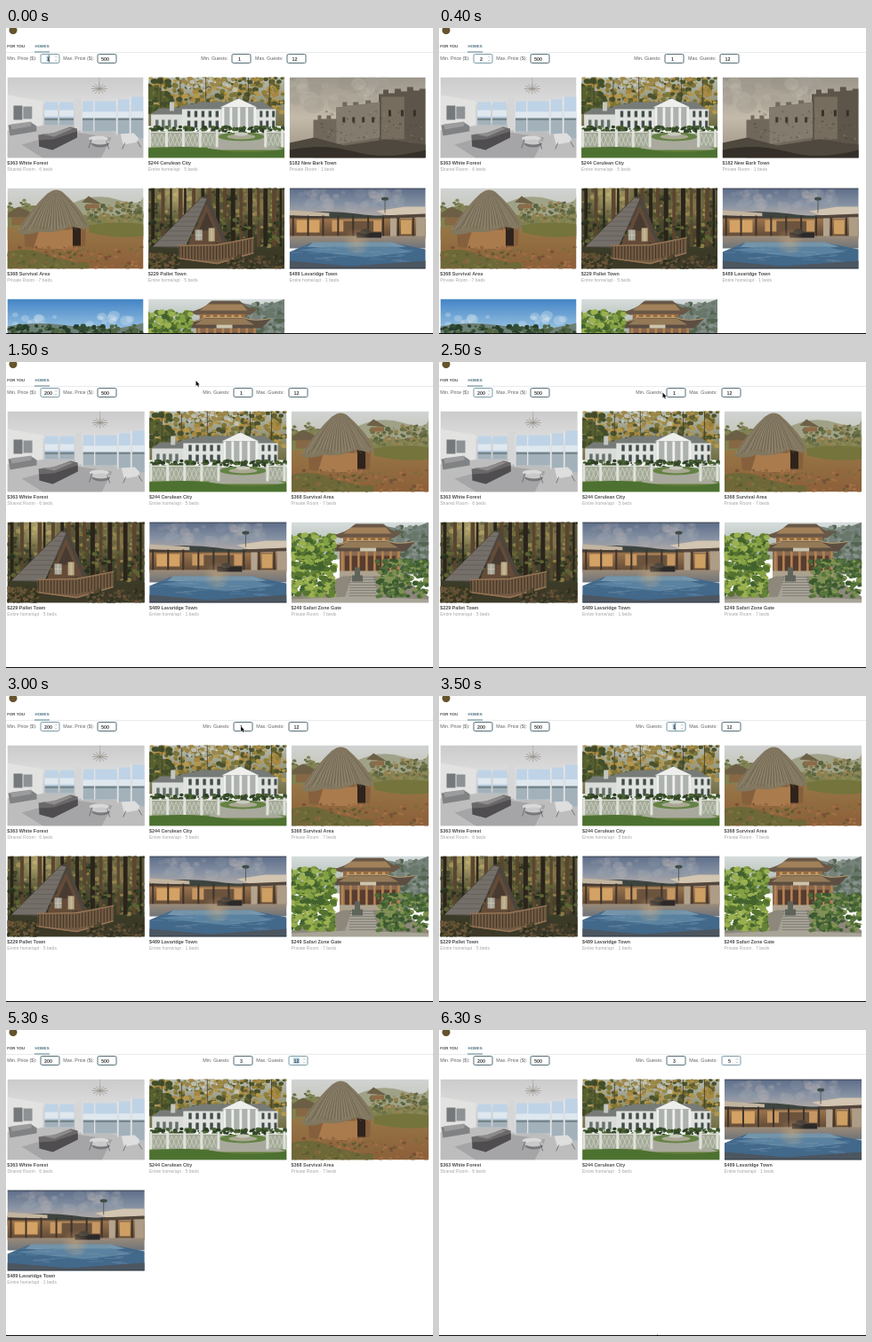
An HTML page with a canvas that plays this animation: 480 by 345 pixels, repeating every 6400 ms.

```html
<!DOCTYPE html>
<html lang="en">
<head>
<meta charset="utf-8">
<title>Homes</title>
<style>
html, body { margin: 0; width: 100%; height: 100%; overflow: hidden; background: #fff; }
canvas { display: block; width: 480px; height: 345px; }
</style>
</head>
<body>
<canvas id="stage" width="480" height="345"></canvas>
<script>
const LOOP = 6400, STEP = 100, PHOTO_W = 154, PHOTO_H = 91;
const SANS = '"Liberation Sans", Arial, sans-serif';
const c = document.getElementById('stage').getContext('2d');

// ---------- drawing helpers ----------
let seed = 1;
function rnd() {
  seed = (seed * 16807) % 2147483647;
  return seed / 2147483647;
}
function box(color, x, y, w, h) {
  c.fillStyle = color;
  c.fillRect(x, y, w, h);
}
function shape(color, path) {
  c.fillStyle = color;
  c.fill(new Path2D(path));
}
function line(color, width, path) {
  c.strokeStyle = color;
  c.lineWidth = width;
  c.stroke(new Path2D(path));
}
function oval(color, x, y, rx, ry) {
  c.fillStyle = color;
  c.beginPath();
  c.ellipse(x, y, rx, ry, 0, 0, 7);
  c.fill();
}
function fade(y, h, ...colors) {
  const g = c.createLinearGradient(0, y, 0, y + h);
  colors.forEach((color, i) => g.addColorStop(i / (colors.length - 1), color));
  box(g, 0, y, PHOTO_W, h);
}
function glow(color, x, y, r) {
  const g = c.createRadialGradient(x, y, 0, x, y, r);
  g.addColorStop(0, color);
  g.addColorStop(1, color.slice(0, 7) + '00');
  oval(g, x, y, r, r);
}
function dabs(count, x, y, w, h, size, ...colors) {
  for (let i = 0; i < count; i++) {
    const r = size * (.5 + rnd());
    oval(colors[i % colors.length], x + rnd() * w, y + rnd() * h, r, r * .8);
  }
}
function row(color, x0, x1, gap, y, w, h) {
  for (let x = x0; x <= x1; x += gap) box(color, x, y, w, h);
}
function text(str, x, y, size, color, weight = '', align = 'left') {
  c.font = `${weight} ${size}px ${SANS}`;
  c.textAlign = align;
  c.fillStyle = color;
  c.fillText(str, x, y);
}

// ---------- photos, each in a 154 x 91 area ----------
function room() {
  fade(0, 30, '#cbcbcc', '#dcdcdc');
  fade(30, 61, '#d6d5d4', '#bbbaba');
  shape('#e2e2e1', 'M0 20L40 27V54L0 62Z');
  shape('#bdbdbd', 'M0 60L62 52L154 68V91H0Z');
  shape('#a5a5a7', 'M16 76L70 61L118 68L106 91H40Z');
  for (const [x, y, w, h] of [[42, 28, 15, 26], [59, 28, 16, 26], [85, 27, 38, 34], [125, 25, 13, 39], [140, 22, 14, 47]]) {
    box('#bfd3e6', x, y, w, h);
    box('#dfe8ef', x, y + h * .35, w, h * .27);
    box('#76868c', x, 46, w, 3);
    box('#a3b1ba', x, 49, w, y + h - 49);
  }
  line('#e6e6e6', 1.2, 'M84 26V62M98 27V61M124 25V65M139 22V69');
  box('#d6d6d6', 76, 24, 8, 36);
  box('#74797b', 7, 32, 10, 16);
  box('#8f9294', 18, 33, 10, 14);
  shape('#808284', 'M1 54L27 51L33 55V61L3 66Z');
  shape('#9c9c9e', 'M4 53L27 50V55L5 59Z');
  shape('#6a6868', 'M35 65L52 63L71 56L79 58V68L51 82L36 78Z');
  shape('#4f4d4f', 'M36 71L52 70L79 61V68L51 82L36 78Z');
  shape('#8d8b8b', 'M38 64L51 63L70 57L74 58L53 67Z');
  oval('#d9d9d9', 103, 69, 11, 3);
  oval('#77787a', 105, 75, 10, 4);
  oval('#c9c9ca', 105, 73, 10, 3);
  shape('#dedede', 'M128 64L143 63L148 68V73L131 76Z');
  line('#626467', .8, 'M95 70L92 80M112 72L115 81M133 74L130 81M147 72L151 79');
  for (let i = 0; i < 12; i++) {
    const a = i * Math.PI / 6;
    line('#8d887d', .6, `M104 13l${9 * Math.cos(a)} ${6 * Math.sin(a)}`);
  }
  line('#999', .5, 'M104 0V13');
}

function mansion() {
  fade(0, 55, '#b5bcb2', '#716d42');
  dabs(420, 0, 0, 154, 40, 2.4, '#95803a', '#615f30', '#a98740', '#4b522b', '#b4974c', '#7c7538');
  dabs(50, 38, 0, 62, 15, 2.5, '#ccd4d8b0', '#9a8648');
  dabs(60, 0, 4, 24, 38, 3, '#424d2a', '#57602f');
  line('#453b29', .8, 'M14 0V34M36 3V28M65 0V25M113 0V28M137 0V38');
  shape('#777b78', 'M3 42L12 35H31L40 32L61 28H130L143 37V44H3Z');
  box('#d9dcd9', 3, 42, 36, 17);
  box('#dfe2de', 38, 36, 106, 23);
  shape('#eeefec', 'M81 34L102 24L123 34Z');
  box('#aeb2ae', 83, 34, 38, 25);
  row('#f0f1ee', 83, 121, 9, 34, 2.8, 26);
  row('#434d4b', 44, 77, 8, 38, 3.4, 7);
  row('#434d4b', 44, 77, 8, 49, 3.4, 8);
  row('#434d4b', 126, 141, 7, 38, 3, 7);
  row('#434d4b', 126, 141, 7, 49, 3, 8);
  row('#67716b', 8, 34, 7, 48, 3.4, 9);
  box('#c4c6c2', 24, 28, 5, 10);
  dabs(150, 0, 56, 154, 7, 2, '#34492a', '#4a6131', '#2b3d23');
  fade(64, 27, '#7d9247', '#557433');
  shape('#a9aa9d', 'M76 63H132L143 78L154 82H66Z');
  oval('#648243', 105, 67, 26, 5);
  oval('#a9a893', 105, 67, 16, 3);
  oval('#c8c9bf', 105, 64, 8, 2);
  for (const [x, w] of [[0, 76], [131, 23]]) {
    box('#a4ab98', x, 62, w, 17);
    for (let i = x; i < x + w - 3; i += 5) line('#d2d5ca', .7, `M${i} 64l5 13M${i + 5} 64l-5 13`);
    box('#dadcd3', x, 61, w, 1.5);
    row('#e0e2da', x, x + w, 19, 59, 3, 20);
  }
  shape('#4d7130', 'M0 80Q48 76 80 82T154 81V91H0Z');
}

function castle() {
  fade(0, 91, '#9b958a', '#c3baaa', '#9a9080');
  dabs(45, 0, 0, 115, 32, 8, '#aaa39835', '#c8c1b540', '#8b857c30');
  shape('#70685b', 'M27 91V48H32V43H36V47H42V43H47V47H53V34H60V28H65V32H72V28H78V31H86V26H92V29H102V91Z');
  shape('#5d554a', 'M101 91V19H106V14H112V18H119V13H126V16H133V11H140V15H147V13H154V91Z');
  shape('#837b6d', 'M53 34L102 28V68L53 76Z');
  shape('#766d5f', 'M104 22H130V70H104Z');
  dabs(180, 31, 37, 120, 46, 1, '#4b443b80', '#928a7a70', '#62594d90');
  row('#3d372f', 60, 98, 11, 45, 3, 6);
  row('#373129', 112, 146, 14, 37, 3, 7);
  shape('#4f483e', 'M0 74L28 68L62 77L110 70L154 76V91H0Z');
  shape('#342f28', 'M0 82Q38 74 74 84T154 82V91H0Z');
}

function hut() {
  fade(0, 38, '#d0d3d2', '#c1c1b1');
  shape('#a0a288', 'M70 19Q98 4 125 13T154 9V45H55Z');
  shape('#81814f', 'M0 25Q30 14 68 26T154 26V58H0Z');
  dabs(130, 88, 16, 66, 22, 2, '#6a7048', '#8c8859', '#59633f', '#94804f');
  dabs(40, 0, 12, 30, 22, 2, '#68714a', '#858558');
  fade(44, 47, '#967646', '#8c5f39');
  shape('#74743c', 'M92 42Q124 36 154 41V54Q126 58 93 50Z');
  shape('#6c5f45', 'M1 28L13 21L28 28V33H1Z');
  box('#876744', 5, 33, 20, 9);
  shape('#6c6147', 'M84 16L92 9L107 18Z');
  box('#8c6b48', 89, 18, 15, 5);
  shape('#86603d', 'M18 40H89L88 65Q55 73 20 66Z');
  shape('#a97b4d', 'M36 47H74V68Q48 70 30 67Z');
  box('#2f231b', 74, 42, 9, 23);
  shape('#82775f', 'M11 50Q25 25 46 6Q54 -1 62 4Q78 18 88 33L93 45Q84 47 73 43Q54 52 36 49Q20 55 11 50Z');
  for (let i = 0; i < 42; i++) {
    const x = 13 + i * 1.85;
    line(i % 2 ? '#655b48' : '#9e937c', .6, `M${54 + (x - 54) * .2} 6Q${54 + (x - 54) * .55} 18 ${x} ${41 + rnd() * 7}`);
  }
  dabs(160, 0, 66, 154, 25, 1.6, '#a36f46', '#785135', '#93663d', '#806a3d');
  shape('#6d6838', 'M0 72Q20 66 44 75T92 84V91H0Z');
  dabs(60, 0, 72, 80, 18, 1.6, '#7b733f', '#5d5c32', '#85633c');
}

function cabin() {
  fade(0, 91, '#5e5a3b', '#2f3222');
  dabs(380, 0, 0, 154, 66, 2.2, '#28331f', '#51542d', '#736c3c', '#384126', '#897c47');
  glow('#e1cf8aa8', 34, 8, 34);
  glow('#c5ac6a80', 122, 20, 28);
  for (let x = 3; x < 154; x += 9) box(x % 2 ? '#2c241b' : '#5b452f', x + rnd() * 4, 0, 2 + rnd() * 3, 66);
  dabs(110, 0, 34, 154, 28, 2, '#353f25', '#5d6234', '#28301f');
  shape('#4d463e', 'M4 66L60 10L67 9L88 60L79 64L66 20L40 68Z');
  shape('#756f69', 'M5 66L60 11L66 12L42 66Z');
  for (let i = 0; i < 9; i++) line('#5d5751', .6, `M${55 - i * 5.4} ${16 + i * 5.4}H${64 - i * 2.3}`);
  shape('#644b38', 'M66 18L84 61L44 66Z');
  shape('#473a30', 'M66 27L75 48H57Z');
  box('#a9a99d', 53, 47, 8, 12);
  box('#b9aa85', 68, 45, 7, 15);
  line('#d0cab6', .7, 'M57 47V59M71.5 45V60M53 53H61');
  shape('#735b43', 'M34 66L85 62L119 57V74L78 86L34 80Z');
  for (let x = 35; x < 119; x += 3.5) {
    const y = x < 78 ? 65 : 65 - (x - 78) * .2;
    line('#3f3326', 1, `M${x} ${y}v16`);
  }
  line('#957354', 1.5, 'M33 65L78 64L119 56M33 79L78 85L119 73');
  shape('#3c3927', 'M0 72Q16 65 34 80L78 87L119 74L154 68V91H0Z');
  dabs(130, 0, 74, 34, 17, 1.6, '#5a502f', '#30331f', '#6b5539');
  dabs(110, 90, 76, 64, 15, 1.6, '#53492f', '#2d3020', '#665138');
}

function pool() {
  fade(0, 36, '#5d6d89', '#8490a2', '#bfb2a8');
  dabs(55, 12, 2, 120, 21, 5, '#a7a9b128', '#c8bcb828');
  shape('#3d443f', 'M0 29Q42 24 77 29T125 27V40H0Z');
  shape('#c2b49f', 'M0 25L45 28V32L0 31Z');
  shape('#463b33', 'M0 31L45 32V35H0Z');
  box('#8c6846', 0, 34, 154, 23);
  fade(35, 19, '#99724b', '#644c38');
  box('#d3a264', 8, 36, 26, 14);
  box('#c69762', 48, 36, 56, 13);
  box('#6c533d', 61, 37, 34, 14);
  row('#3f342c', 3, 150, 17, 31, 2, 24);
  shape('#d2c5b1', 'M98 26L130 21H154V29L112 31Z');
  shape('#53463b', 'M104 31L154 29V33L112 34Z');
  shape('#b4a48f', 'M114 34H121V56H114Z');
  box('#cd9f62', 126, 36, 12, 16);
  box('#ad9c86', 143, 33, 11, 22);
  fade(54, 14, '#9a8b79', '#6e737a');
  box('#2b2929', 76, 50, 28, 6);
  oval('#4a443c', 86, 49, 6, 3);
  shape('#42688a', 'M0 72L24 62H118L154 69V91H0Z');
  shape('#7394aa', 'M27 61H116L132 66L86 70L20 66Z');
  shape('#5b82a0', 'M10 70L40 66H118L140 72L86 78Z');
  for (let i = 0; i < 30; i++) line('#a5bdca48', .7, `M${rnd() * 140} ${63 + rnd() * 20}h${5 + rnd() * 13}`);
  glow('#cfab7e80', 76, 61, 16);
  shape('#4c5660', 'M0 82L68 88L154 82V91H0Z');
  oval('#3f4c48', 108, 12, 4, 2);
  line('#47504a', .8, 'M108 13V28');
  box('#1c1d20', 0, 0, 154, .8);
  box('#1c1d20', 0, 90.2, 154, .8);
}

function valley() {
  fade(0, 60, '#4384c6', '#8bb9dd', '#dce4e5');
  dabs(20, 0, 15, 154, 17, 5, '#d7e5ee50');
  shape('#6c8076', 'M0 31Q35 24 76 31T154 27V48H0Z');
  dabs(220, 0, 30, 154, 17, 2.4, '#334c35', '#526541', '#273d2c');
  fade(45, 46, '#53663a', '#83804d');
}

function temple() {
  fade(0, 42, '#d6dddd', '#a5aea0');
  shape('#76827a', 'M66 12L86 3L108 5L130 9L154 0V59H66Z');
  dabs(200, 84, 4, 70, 42, 2.4, '#67776a', '#87918a', '#536551');
  box('#8a6950', 54, 32, 68, 26);
  shape('#695747', 'M44 15Q62 12 69 4L72 2H103L107 5Q112 11 125 11L115 18H55Z');
  shape('#a1815a', 'M67 6H106L112 13H58Z');
  box('#966b45', 58, 17, 52, 7);
  row('#c5a05f', 62, 106, 8, 18, 3, 4);
  shape('#5c4e41', 'M39 25Q54 26 63 21H108Q120 26 139 22L128 33H47Z');
  shape('#957a58', 'M63 22H108L120 29H53Z');
  line('#b69c72', 1, 'M39 25Q55 27 64 21H107Q119 26 138 22');
  box('#583c30', 60, 38, 57, 18);
  row('#b38451', 56, 120, 9, 33, 2.6, 25);
  box('#cdc4ad', 77, 29, 18, 4);
  box('#ada28e', 54, 55, 70, 8);
  shape('#8d887b', 'M0 84L58 61H122L154 84V91H0Z');
  shape('#a5a196', 'M68 60H91L99 87H59Z');
  for (let y = 62; y < 87; y += 3) line('#77756b', .7, `M65 ${y}H95`);
  shape('#a8a497', 'M0 87L63 84L154 87V91H0Z');
  dabs(460, -2, 14, 50, 69, 2.8, '#638139', '#84a042', '#42622e', '#9bb150', '#55732f');
  dabs(280, 96, 43, 58, 41, 2.4, '#58763d', '#3b592f', '#7f9150', '#4a6837');
  shape('#5e645b', 'M71 51H77V60H80V67H68V60H71Z');
}

const homes = [
  [room, '$363 White Forest', 'Shared Room · 6 beds'],
  [mansion, '$244 Cerulean City', 'Entire home/apt · 5 beds'],
  [castle, '$182 New Bark Town', 'Private Room · 1 beds'],
  [hut, '$368 Survival Area', 'Private Room · 7 beds'],
  [cabin, '$229 Pallet Town', 'Entire home/apt · 5 beds'],
  [pool, '$489 Lavaridge Town', 'Entire home/apt · 1 beds'],
  [valley, '', ''],
  [temple, '$249 Safari Zone Gate', 'Private Room · 7 beds']
];

// ---------- timeline ----------
const at = (keys, t) => keys.filter(([start]) => start <= t).pop()[1];
const minPrice = [[0, '1'], [400, '2'], [500, '20'], [700, '200']];
const minGuests = [[0, '1'], [3600, '3']];
const maxGuests = [[0, '12'], [5500, '5']];
const focusKeys = [[0, 0], [3100, 2], [5000, 3]];
const selectedKeys = [[0, true], [400, false], [3300, true], [3600, false], [5200, true], [5500, false]];
const visibleHomes = [
  [0, [0, 1, 2, 3, 4, 5, 6, 7]],
  [1300, [0, 1, 3, 4, 5, 7]],
  [4000, [0, 1, 3, 5]],
  [5600, [0, 1, 5]]
];
const cursorPaths = [
  [[1300, 90, 31], [1500, 213.5, 21], [2500, 251.5, 34.5], [3000, 264, 34]],
  [[4400, 266, 35], [5000, 324, 35]],
  [[5900, 326, 36], [6300, 245, 343]]
];

function cursorAt(t) {
  for (const path of cursorPaths) {
    for (let i = 1; i < path.length; i++) {
      const [t0, x0, y0] = path[i - 1], [t1, x1, y1] = path[i];
      if (t < t0 || t > t1) continue;
      const k = (t - t0) / (t1 - t0), e = k * k * (3 - 2 * k);
      return [x0 + (x1 - x0) * e, y0 + (y1 - y0) * e];
    }
  }
  return null;
}

// ---------- page ----------
function card([photo, title, detail], x, y, w) {
  c.save();
  c.translate(x, y);
  c.scale(w / PHOTO_W, 1);
  c.beginPath();
  c.rect(0, 0, PHOTO_W, PHOTO_H);
  c.clip();
  seed = 4217;
  photo();
  c.restore();
  text(title, x - .3, y + 98.7, 5.4, '#505050', 'bold');
  text(detail, x - .3, y + 105.6, 5.1, '#a6a6a6');
}

function field(label, labelX, x, value, focused, selected) {
  text(label, labelX, 36, 5.35, '#606060');
  c.strokeStyle = focused ? '#7b9ba6' : '#566e77';
  c.lineWidth = 1;
  c.beginPath();
  c.roundRect(x, 29.5, 21, 10, 1.5);
  c.stroke();
  if (selected) {
    const w = value.length * 3.2 + .6;
    box('#b4d2e8', x + 8.5 - w / 2, 31, w, 7);
  }
  text(value, x + 8.5, 36.8, 5.4, '#444', 'bold', 'center');
  if (focused) line('#9aa4a9', .6, `M${x + 16} 33.5l1.2 -1.3l1.2 1.3M${x + 16} 35.8l1.2 1.3l1.2 -1.3`);
  if (selected && value === '1') line('#555', .6, `M${x + 8.4} 31h2.2M${x + 9.5} 31v7M${x + 8.4} 38h2.2`);
}

function draw(t) {
  const shown = at(visibleHomes, t);
  const wide = shown.length < 7;
  const focus = at(focusKeys, t), selected = at(selectedKeys, t);
  const shift = wide ? 2 : 0;
  box('#fff', 0, 0, 480, 345);

  oval('#64532c', 8, 2.5, 4.5, 4.5);
  text('FOR YOU', 1.3, 22, 4.35, '#444', 'bold');
  text('HOMES', 32.6, 22, 4.35, '#4b7180', 'bold');
  box('#dfe4e5', 0, 27, 480, .7);
  box('#5d818c', 32, 26.5, 17, 1);

  const fields = [
    ['Min. Price ($):', 1.3, 39, at(minPrice, t)],
    ['Max. Price ($):', 64.3, 103, '500'],
    ['Min. Guests:', 219.3 + shift, 254 + shift, at(minGuests, t)],
    ['Max. Guests:', 280 + shift * .6, 316 + shift, at(maxGuests, t)]
  ];
  fields.forEach((f, i) => field(...f, i === focus, i === focus && selected));

  const width = wide ? 154.3 : 153, pitch = wide ? 159.7 : 158.6;
  shown.forEach((id, i) => card(homes[id], 1.5 + (i % 3) * pitch, 55.5 + Math.floor(i / 3) * 125, width));

  const cursor = cursorAt(t);
  if (cursor) {
    c.save();
    c.translate(...cursor);
    const arrow = 'M0 0V6L1.4 4.8L2.5 7L3.5 6.5L2.4 4.4H4.2Z';
    line('#fff', .9, arrow);
    shape('#111', arrow);
    c.restore();
  }
  box('#111', 0, 344, 480, 1);
}

const start = performance.now();
let last = -1;
function tick(now) {
  const t = Math.floor((Math.max(0, now - start) % LOOP) / STEP) * STEP;
  if (t !== last) draw(last = t);
  requestAnimationFrame(tick);
}
draw(0);
requestAnimationFrame(tick);
</script>
</body>
</html>
```
